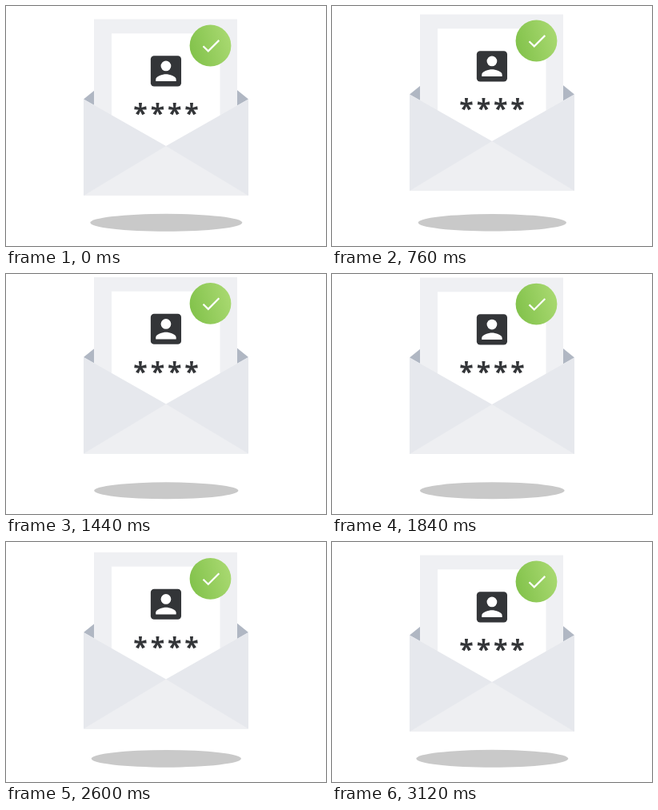
Write an HTML page that moves like this. It is 400x300 px and loops after 3160 ms.

```html
<!DOCTYPE html>
<html lang="en">
<head>
<meta charset="utf-8">
<title>Floating envelope</title>
<style>
  html, body { margin: 0; width: 100%; height: 100%; overflow: hidden; background: #fff; }
  svg { display: block; width: 100vw; height: 100vh; }
  text { font: 700 32px "Open Sans", "Noto Sans", sans-serif; letter-spacing: 3.9px; }
</style>
</head>
<body>
<svg viewBox="0 0 400 300">
  <defs>
    <linearGradient id="green" x1="0" y1=".65" x2="1" y2=".35">
      <stop offset="0" stop-color="#82c24b"/>
      <stop offset="1" stop-color="#a9d971"/>
    </linearGradient>
  </defs>

  <ellipse id="shadow" cx="200.3" cy="270.8" fill="#c9c9c9"/>

  <g id="letter">
    <path d="M97 116.5L200 33L303 116.5L200 175Z" fill="#b0b7c3"/>

    <!-- paper -->
    <rect x="110" y="16.5" width="179" height="190" fill="#eff0f3"/>
    <rect x="132" y="34.3" width="135.5" height="160" fill="#fff"/>

    <!-- profile icon -->
    <g transform="translate(174.5 55.9) scale(2.12)">
      <rect x="3" y="3" width="18" height="18" rx="2" fill="#333538"/>
      <circle cx="12" cy="9" r="3" fill="#fff"/>
      <path d="M6 17c0-2 4-3.1 6-3.1s6 1.1 6 3.1v1H6z" fill="#fff"/>
    </g>
    <text x="202" y="146.4" text-anchor="middle" fill="#333538">****</text>

    <!-- envelope front -->
    <path d="M97 116.5L200 175L303 116.5V237H97Z" fill="#e6e8ed"/>
    <path d="M97 237L200 175L303 237Z" fill="#eeeff2"/>

    <!-- badge -->
    <circle cx="255.5" cy="49.5" r="25.9" fill="url(#green)"/>
    <path d="M246.5 50.3L252.8 56.4L266.3 42.9" fill="none" stroke="#fff" stroke-width="2.2"/>
  </g>
</svg>
<script>
  const LOOP = 3160, STEP = 40, LIFT = 12.8;
  const letter = document.getElementById("letter");
  const shadow = document.getElementById("shadow");

  function draw(time) {
    const t = Math.floor((time % LOOP) / STEP) * STEP;
    const rise = (1 - Math.cos(2 * Math.PI * t / LOOP)) / 2;
    letter.setAttribute("transform", `translate(0 ${-LIFT * rise})`);
    shadow.setAttribute("rx", 95 - 5 * rise);
    shadow.setAttribute("ry", 11 - 0.55 * rise);
  }

  const start = performance.now();
  function tick() {
    draw(performance.now() - start);
    requestAnimationFrame(tick);
  }
  tick();
</script>
</body>
</html>
```
